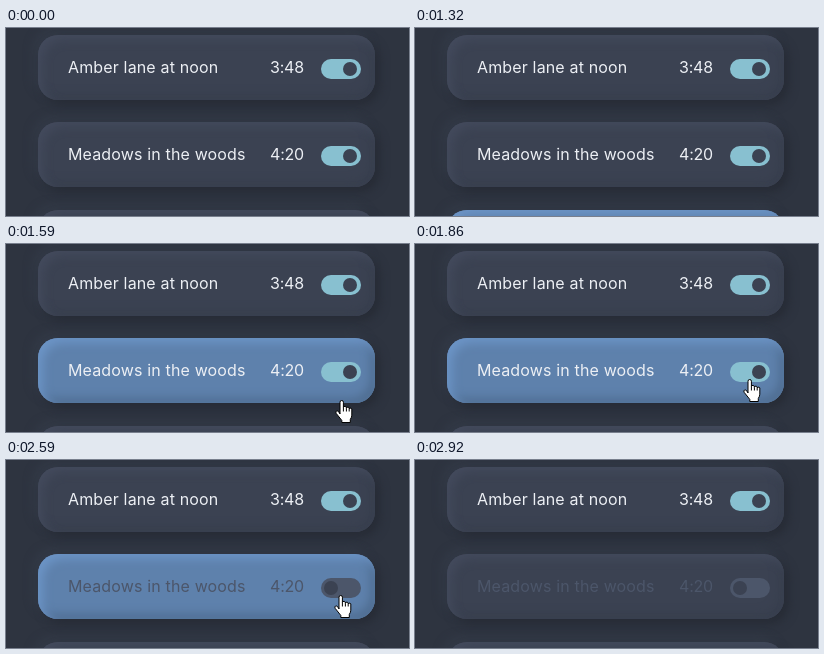
Animation of 403 by 188 pixels, one loop 4.52 s. Source, as an HTML page:

```html
<!DOCTYPE html>
<html lang="en">
<head>
<meta charset="utf-8">
<title>Playlist</title>
<style>
  html, body { margin: 0; width: 100%; height: 100%; overflow: hidden; background: #2e3440; }
  .stage { position: relative; width: 403px; height: 188px; overflow: hidden; }

  .card, .card::before { border-radius: 20px; }
  .card {
    position: absolute; left: 32px; top: var(--y); width: 337px; height: 65px;
    background: #3b4252; color: #eceff4;
    font: 16px/20px Inter, "Open Sans", sans-serif; letter-spacing: .15px; white-space: nowrap;
    box-shadow: 5px 5px 10px #272c36, -5px -5px 10px #333a47,
      inset 5px 5px 10px #434a5c, inset -5px -5px 10px #383f4e;
  }
  .card::before {
    content: ""; position: absolute; inset: 0; opacity: 0; background: #5e81ac;
    box-shadow: inset 5px 5px 10px #6c94c6, inset -5px -5px 10px #506e92;
  }
  .title, .time, .switch { position: absolute; }
  .title { left: 30px; top: 22px; }
  .time { left: 232px; top: 22px; letter-spacing: -.2px; }
  .switch { left: 283px; top: 24px; width: 40px; height: 20px; border-radius: 10px; background: #88c0d0; }
  .switch::after {
    content: ""; position: absolute; left: 22px; top: 3px; width: 14px; height: 14px;
    border-radius: 50%; background: #3b4252;
  }

  .pointer, .click { position: absolute; left: 0; top: 0; }
  .pointer { overflow: visible; fill: #fff; stroke: #000; stroke-linejoin: round; }
  .click {
    left: 322px; top: 123px; width: 24px; height: 24px; border-radius: 50%;
    background: rgba(255, 255, 0, .55); opacity: 0;
  }

  .second::before, .third::before, .second, .second .switch, .second .switch::after,
  .pointer, .click { animation: 4.52s step-end infinite; }
  .second::before { animation-name: hover-second; }
  .third::before { animation-name: hover-third; }
  .second { animation-name: dim; }
  .second .switch { animation-name: track; }
  .second .switch::after { animation-name: knob; }
  .arrow { animation-name: arrow; }
  .hand { animation-name: hand; }
  .click { animation-name: click; }

  @keyframes hover-second { 0%, 64.601% { opacity: 0 } 35.176% { opacity: 1 } }
  @keyframes hover-third {
    0%, 23.451%, 32.3% { opacity: 0 }
    20.575%, 29.203% { opacity: 1 }
  }
  @keyframes dim { 0% { color: #eceff4 } 57.3%, 100% { color: #4c566a } }
  @keyframes track { 0% { background: #88c0d0 } 57.3%, 100% { background: #4c566a } }
  @keyframes knob { 0% { left: 22px } 57.3%, 100% { left: 3px } }
  @keyframes click { 0%, 57.3% { opacity: 0 } 54.203% { opacity: 1 } }
  @keyframes arrow {
    0%, 35.176%, 100% { transform: translate(334px, 220px) }
    32.3% { transform: translate(334px, 172px) }
    33.849% { transform: translate(334px, 161px) }
  }
  @keyframes hand {
    0%, 32.3%, 64.601%, 100% { transform: translate(329px, 220px) }
    30.752% { transform: translate(328px, 183px) }
    35.176% { transform: translate(329px, 156px) }
    36.725% { transform: translate(329px, 150px) }
    38.053% { transform: translate(329px, 145px) }
    39.601% { transform: translate(329px, 140px) }
    41.15% { transform: translate(328px, 135px) }
    63.273% { transform: translate(325px, 156px) }
  }
</style>
</head>
<body>
<div class="stage">
  <div class="card" style="--y: 7px">
    <span class="title">Amber lane at noon</span><span class="time">3:48</span><i class="switch"></i>
  </div>
  <div class="card second" style="--y: 94px">
    <span class="title">Meadows in the woods</span><span class="time">4:20</span><i class="switch"></i>
  </div>
  <div class="card third" style="--y: 182px"></div>
  <div class="click"></div>
  <svg class="pointer arrow" width="13" height="21">
    <path d="M.5 1V17.2L4.2 13.7 6.8 19.8 9.6 18.6 7 12.6H12.2Z"/>
  </svg>
  <svg class="pointer hand" width="18" height="24">
    <path d="M5 14V2.2a1.7 1.7 0 0 1 3.4 0V7.6a1.5 1.5 0 0 1 3 .6a1.4 1.4 0 0 1 2.8 .8a1.3 1.3 0 0 1 2.6 1V15.2q0 2-1.5 4.2V22.5H6.8V20.4L1.2 13.4q-1-1.7 .4-2.4q1.3-.4 2.3 1Z"/>
    <path fill="none" d="M8.4 7.6V11.5M11.4 8.2V11.5M14.2 9V11.5"/>
  </svg>
</div>
</body>
</html>
```
